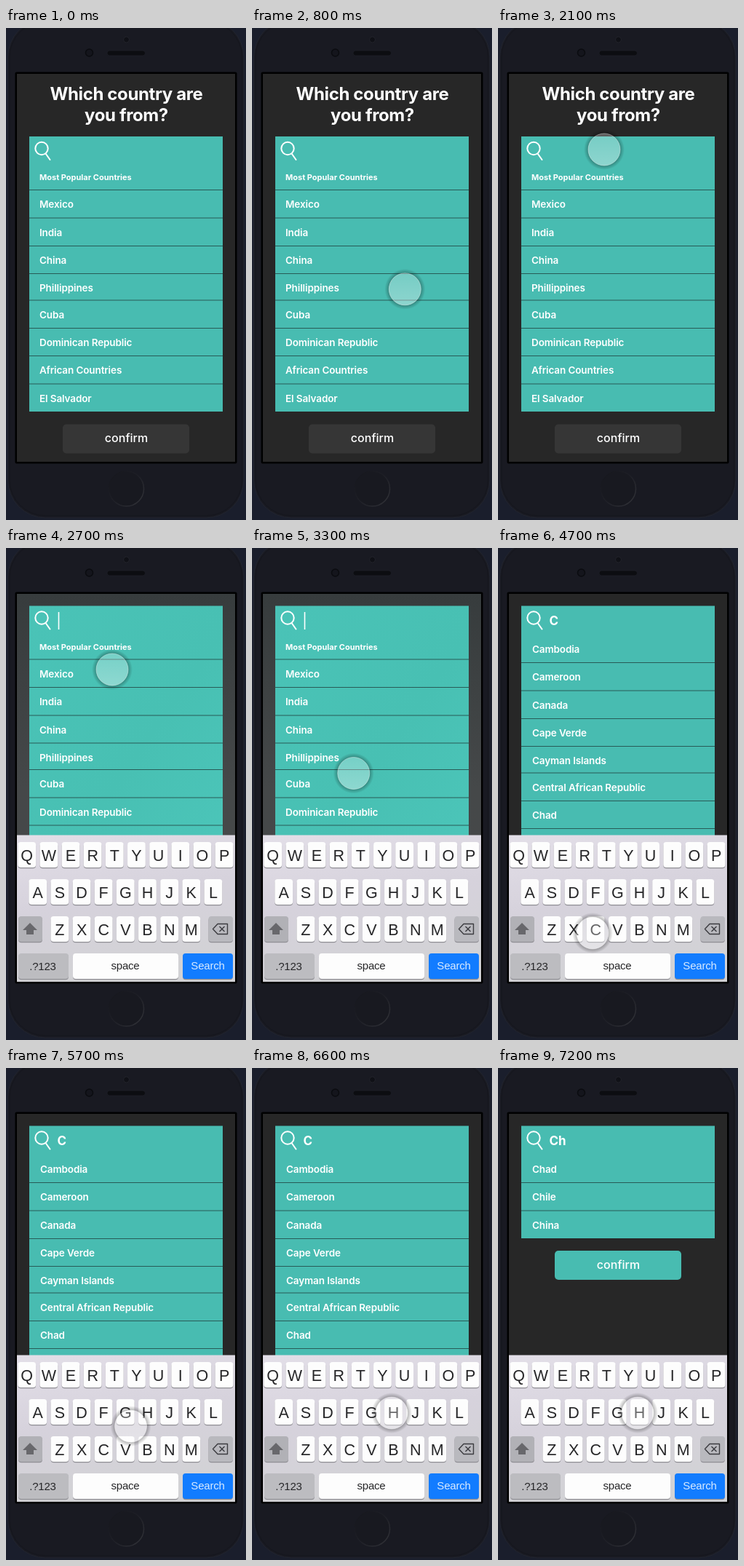
An HTML page for the animation above (7300 ms loop, 330 by 676 pixels).

```html
<!DOCTYPE html>
<html lang="en">
<head>
<meta charset="utf-8">
<title>Country picker</title>
<style>
html, body { margin: 0; width: 100%; height: 100%; overflow: hidden; background: #1a1e2c; }
svg { display: block; width: 100vw; height: 100vh; }
text { font-family: Inter, "Open Sans", sans-serif; fill: #fff; }
.title { font-size: 24px; font-weight: 700; letter-spacing: -.37px; text-anchor: middle; }
.row { font-size: 13.5px; font-weight: 600; letter-spacing: -.12px; }
.head { font-size: 11px; font-weight: 700; }
.query { font-size: 17px; font-weight: 700; }
.button { font-size: 16px; font-weight: 500; text-anchor: middle; }
.key { font: 21.5px "Liberation Sans", Arial, sans-serif; fill: #262628; text-anchor: middle; }
.word { font-size: 15px; letter-spacing: -.2px; }
</style>
</head>
<body>
<svg viewBox="0 0 330 676" preserveAspectRatio="xMidYMid meet">
  <defs>
    <linearGradient id="board" x1="0" y1="0" x2=".25" y2="1">
      <stop offset="0" stop-color="#e3dfe8"/>
      <stop offset=".5" stop-color="#d6d2dc"/>
      <stop offset="1" stop-color="#d2d2d5"/>
    </linearGradient>
    <linearGradient id="veil" x1="0" y1="0" x2="0" y2="1">
      <stop offset="0" stop-color="#373c3d"/>
      <stop offset=".5" stop-color="#454849"/>
      <stop offset="1" stop-color="#474849"/>
    </linearGradient>
    <linearGradient id="mint" x1="0" y1="0" x2="1" y2="1">
      <stop offset="0" stop-color="#4ac3b7"/>
      <stop offset=".55" stop-color="#48c0b3"/>
      <stop offset="1" stop-color="#4cc6ba"/>
    </linearGradient>
    <linearGradient id="home" x1="0" y1="0" x2="1" y2="1">
      <stop offset="0" stop-color="#14151b"/>
      <stop offset=".5" stop-color="#1f2027"/>
      <stop offset="1" stop-color="#34353b"/>
    </linearGradient>
    <radialGradient id="halo">
      <stop offset=".76" stop-color="#000" stop-opacity="0"/>
      <stop offset=".8" stop-color="#000" stop-opacity=".26"/>
      <stop offset="1" stop-color="#000" stop-opacity="0"/>
    </radialGradient>
    <linearGradient id="glass" x1="0" y1="0" x2="0" y2="1">
      <stop offset="0" stop-color="#fff" stop-opacity=".25"/>
      <stop offset="1" stop-color="#fff" stop-opacity=".38"/>
    </linearGradient>
    <clipPath id="screen"><rect x="15" y="63" width="300" height="533"/></clipPath>
  </defs>

  <rect width="330" height="676" fill="#1a1e2c"/>
  <rect x="2.5" y="-12" width="324.5" height="685" rx="52" fill="#191a22" stroke="#22252f"/>
  <rect x="5" y="-9" width="319.500" height="679" rx="49" fill="none" stroke="#15161d"/>
  <circle cx="165.500" cy="16" r="4" fill="#101117" stroke="#22232b"/>
  <circle cx="114.500" cy="34" r="5" fill="#14151c" stroke="#0b0c10" stroke-width="1.500"/>
  <rect x="139" y="31" width="52.500" height="7" rx="3.500" fill="#0c0d11" stroke="#20212a" stroke-width=".7"/>
  <circle cx="165.500" cy="633" r="24" fill="#181920" stroke="url(#home)" stroke-width="1.500"/>
  <rect x="12.500" y="60.500" width="305" height="538" rx="2" fill="#000"/>

  <g clip-path="url(#screen)">
    <g id="start"></g>
    <g id="focus"></g>
    <g id="one"></g>
    <g id="two"></g>
    <g id="keys"></g>
  </g>
  <g id="pointer">
    <circle r="28" fill="url(#halo)"/>
    <circle r="22" fill="url(#glass)" stroke="#fff" stroke-opacity=".4"/>
  </g>
</svg>
<script>
const LOOP = 7300, STEP = 100, TEAL = '#48bcb1';
const $ = id => document.getElementById(id);

const rect = (x, y, w, h, fill, r = 0) =>
  `<rect x="${x}" y="${y}" width="${w}" height="${h}" rx="${r}" fill="${fill}"/>`;
const text = (x, y, cls, str, extra = '') =>
  `<text x="${x}" y="${y}" class="${cls}" ${extra}>${str}</text>`;
const backdrop = fill => rect(15, 63, 300, 533, fill);
const lens = y => `<g transform="translate(49 ${y})" fill="none" stroke="#fff" stroke-width="2">
  <circle r="8.700"/><path d="M5.500 7L11.500 15.500" stroke-linecap="round"/></g>`;
const button = (y, fill) =>
  rect(78, y, 174, 40, fill, 5) + text(165.5, y + 24.5, 'button', 'confirm');

// Row dividers, measured on the opening screen
const lines = [222.5, 261, 299.5, 337.5, 374, 412.5, 450.5, 489];

function rows(names, x, shift, first) {
  return names.map((name, i) => {
    const k = i + first;
    const y = k < 0 ? 208.5 : lines[k] + 24.5;
    return text(x, y + shift, 'row', name);
  }).join('');
}
const dividers = (count, shift) => lines.slice(0, count).map(y =>
  `<path d="M32 ${y + shift}H298" stroke="#285b57"/>`).join('');

const popular = ['Mexico', 'India', 'China', 'Phillippines', 'Cuba',
  'Dominican Republic', 'African Countries', 'El Salvador'];
const withC = ['Cambodia', 'Cameroon', 'Canada', 'Cape Verde', 'Cayman Islands',
  'Central African Republic', 'Chad'];

function popularList(shift, fill) {
  return rect(32, 149 + shift, 266, 378, fill) + lens(165.5 + shift) +
    text(46, 209 + shift, 'head', 'Most Popular Countries') +
    dividers(8, shift) + rows(popular, 46, shift, 0);
}
function results(query, names, height, count) {
  return backdrop('#272727') + rect(32, 79.5, 266, height, TEAL) + lens(96) +
    text(70.5, 105.5, 'query', query) + dividers(count, -65) + rows(names, 47, -65, -1);
}

function key(x, y, w, fill = '#fdfdfd') {
  return rect(x, y + 1.3, w, 35, '#8f8e94', 4) + rect(x, y, w, 35, fill, 4);
}
function letters(str, x, y) {
  return [...str].map((c, i) => {
    const cx = x + i * 30.15;
    return key(cx - 12.4, y, 24.8) + text(cx, y + 25.5, 'key', c);
  }).join('');
}
function keyboard() {
  return rect(15, 394.5, 300, 202, 'url(#board)') +
    letters('QWERTYUIOP', 28.7, 404) +
    letters('ASDFGHJKL', 43.7, 455) +
    letters('ZXCVBNM', 73.9, 506) +
    key(17, 506, 33, '#b1b1b6') +
    '<path d="M33 515L43 525H38V531H28V525H23Z" fill="#68686c"/>' +
    key(278.5, 506, 33.5, '#b9b9be') +
    `<path d="M291 516.500H304.500V530.500H291L284.500 523.500ZM293.500 520L300.500 527M300.500 520L293.500 527"
      fill="none" stroke="#3c3c40" stroke-width="1.400" stroke-linejoin="round"/>` +
    key(17, 557, 69, '#bcbcc0') + text(50.5, 580, 'key word', '.?123') +
    key(92, 557, 145) + text(164, 579, 'key word', 'space') +
    key(243, 557, 69, '#127cff') + text(277.5, 579, 'key word', 'Search', 'style="fill:#d8eaff"');
}

$('start').innerHTML = backdrop('#272727') +
  text(165.5, 99, 'title', 'Which country are') + text(165.5, 128, 'title', 'you from?') +
  popularList(0, TEAL) + button(544.5, '#363636');
$('focus').innerHTML = backdrop('url(#veil)') + popularList(-69.5, 'url(#mint)') +
  rect(71.7, 88, 1.6, 24, '#fff');
$('one').innerHTML = results('C', withC, 330, 7);
$('two').innerHTML = results('Ch', ['Chad', 'Chile', 'China'], 154.5, 2) + button(251, TEAL);
$('keys').innerHTML = keyboard();

// Pointer legs: start time, end time, destination
const home = [338, 740];
const legs = [
  [300, 1117, [146, 167]],
  [3000, 3700, [130, 529]],
  [5300, 5950, [192, 474]]
];
const clamp = u => Math.min(1, Math.max(0, u));
const ease = u => u * u * (3 - 2 * u);

function pointerAt(t) {
  let [x, y] = home;
  for (const [from, to, [tx, ty]] of legs) {
    const u = ease(clamp((t - from) / (to - from)));
    x += (tx - x) * u;
    y += (ty - y) * u;
  }
  return [x, y];
}
const show = (id, alpha) => $(id).setAttribute('opacity', alpha);

function draw(t) {
  const fade = clamp((t - 2100) / 300);
  show('focus', fade);
  show('keys', fade);
  show('one', t >= 4500 ? 1 : 0);
  show('two', t >= 6700 ? 1 : 0);
  $('pointer').setAttribute('transform', `translate(${pointerAt(t)})`);
}

const begin = performance.now();
function tick() {
  const t = (performance.now() - begin) % LOOP;
  draw(Math.floor(t / STEP) * STEP);
  requestAnimationFrame(tick);
}
tick();
</script>
</body>
</html>
```
